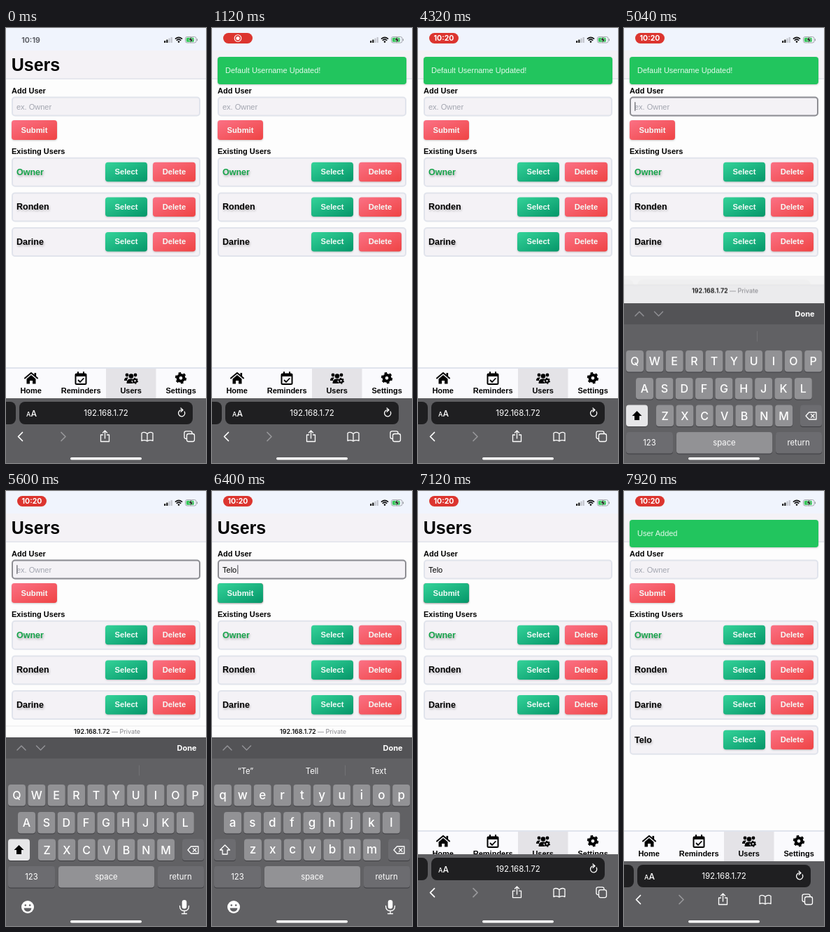
Recreate the animation shown at these times as an HTML page. Size 286 px wide and 618 px high, loop 8000 ms.

```html
<!DOCTYPE html>
<html lang="en">
<head>
<meta charset="utf-8">
<title>Users</title>
<style>
html, body { margin: 0; width: 100%; height: 100%; overflow: hidden; background: #fdfdfd; }
svg { display: block; width: 286px; height: 618px; font: 11px "Liberation Sans", Arial, sans-serif; }
.b { font-weight: 700; }
.sys { font-family: Inter, Roboto, sans-serif; }
.mid { text-anchor: middle; }
.btn { filter: drop-shadow(0 1px 1px #0003); }
.name { font-size: 12.5px; font-weight: 700; filter: drop-shadow(1px 2px 1.5px #0004); }
.line { fill: none; stroke-linecap: round; stroke-linejoin: round; }

/* hard changes */
.banner, .msg1, .msg2, .sel, .focus, .typed, .blank, .c2, .c3, .c4, .caret,
.row4, .upper, .lower, .hint1, .hint2 { animation: 8s step-end infinite; }
.banner { animation-name: banner; }
.msg1 { animation-name: msg1; }
.msg2 { animation-name: msg2; }
.sel0 { animation-name: sel0; }
.sel1 { animation-name: sel1; }
.sel2 { animation-name: sel2; }
.focus { animation-name: focus; }
.typed { animation-name: typed; }
.blank { animation-name: blank; }
.c2 { animation-name: c2; }
.c3 { animation-name: c3; }
.c4 { animation-name: c4; }
.caret { animation-name: caret; }
.row4 { animation-name: row4; }
.upper { animation-name: upper; }
.lower { animation-name: lower; }
.hint1 { animation-name: hint1; }
.hint2 { animation-name: c2; }
@keyframes banner { 0% { opacity: 0 } 13.9% { opacity: 1 } 70% { opacity: 0 } 95% { opacity: 1 } 100% { opacity: 1 } }
@keyframes msg1 { 0% { opacity: 1 } 80%, 100% { opacity: 0 } }
@keyframes msg2 { 0% { opacity: 0 } 80%, 100% { opacity: 1 } }
@keyframes sel0 { 0% { fill: #16a34a } 15% { fill: #000 } 50%, 100% { fill: #16a34a } }
@keyframes sel1 { 0% { fill: #000 } 15% { fill: #16a34a } 30%, 100% { fill: #000 } }
@keyframes sel2 { 0% { fill: #000 } 30% { fill: #16a34a } 50%, 100% { fill: #000 } }
@keyframes focus { 0% { opacity: 0 } 60% { opacity: 1 } 84.8%, 100% { opacity: 0 } }
@keyframes typed { 0% { opacity: 0 } 70.5% { opacity: 1 } 95%, 100% { opacity: 0 } }
@keyframes blank { 0% { opacity: 1 } 70.5% { opacity: 0 } 95%, 100% { opacity: 1 } }
@keyframes c2 { 0% { visibility: hidden } 73.5%, 100% { visibility: visible } }
@keyframes c3 { 0% { visibility: hidden } 76.5%, 100% { visibility: visible } }
@keyframes c4 { 0% { visibility: hidden } 79.5%, 100% { visibility: visible } }
@keyframes caret {
  0% { transform: none } 70.5% { transform: translateX(6.7px) } 73.5% { transform: translateX(12.6px) }
  76.5% { transform: translateX(15px) } 79.5%, 100% { transform: translateX(21px) }
}
@keyframes row4 { 0% { opacity: 0 } 95%, 100% { opacity: 1 } }
@keyframes upper { 0% { opacity: 1 } 70.5%, 100% { opacity: 0 } }
@keyframes lower { 0% { opacity: 0 } 70.5%, 100% { opacity: 1 } }
@keyframes hint1 { 0% { opacity: 0 } 70.5% { opacity: 1 } 73.5%, 100% { opacity: 0 } }

/* slides and fades */
.clock, .pill, .rec, .now { animation: 8s linear infinite; }
.clock { animation-name: clock; }
.pill { animation-name: pill; }
.rec { animation-name: rec; }
.now { animation-name: now; }
@keyframes clock { 0%, 2% { opacity: 1 } 5%, 100% { opacity: 0 } }
@keyframes pill { 0%, 2% { opacity: 0 } 6%, 100% { opacity: 1 } }
@keyframes rec { 0%, 42% { opacity: 1 } 44%, 100% { opacity: 0 } }
@keyframes now { 0%, 42% { opacity: 0 } 44%, 100% { opacity: 1 } }

.keys { animation: keys 8s cubic-bezier(.2,.45,.3,1) infinite, keysFade 8s linear infinite; }
.tools { animation: tools 8s cubic-bezier(.2,.45,.3,1) infinite, toolsFade 8s linear infinite; }
.strip { animation: strip 8s cubic-bezier(.2,.45,.3,1) infinite, stripFade 8s linear infinite; }
.strip rect { animation: tint 8s linear infinite; }
@keyframes keys {
  0%, 60% { transform: translateY(268px) } 66.25%, 84.8% { transform: none }
  91%, 100% { transform: translateY(268px) }
}
@keyframes keysFade { 0%, 87% { opacity: 1 } 88.6%, 100% { opacity: 0 } }
@keyframes tools {
  0%, 60% { transform: none } 66.25%, 84.8% { transform: translateY(-205px) } 91%, 100% { transform: none }
}
@keyframes toolsFade { 0%, 60% { opacity: 1 } 63% { opacity: .06 } 64%, 84.8% { opacity: 0 } 87%, 100% { opacity: 1 } }
@keyframes strip {
  0%, 60% { transform: translateY(205px) } 66.25%, 84.8% { transform: none }
  91%, 100% { transform: translateY(205px) }
}
@keyframes stripFade { 0%, 60% { opacity: 0 } 62.5%, 84.8% { opacity: 1 } 87%, 100% { opacity: 0 } }
@keyframes tint { 0%, 60% { fill: #777779 } 63% { fill: #ebebed } 65.5%, 100% { fill: #fdfdfd } }
</style>
</head>
<body>
<script>
const rect = (x, y, w, h, fill, r = 0, more = '') =>
  `<rect x="${x}" y="${y}" width="${w}" height="${h}" rx="${r}" fill="${fill}" ${more}/>`;
const text = (x, y, s, cls = '', fill = '#000', more = '') =>
  `<text x="${x}" y="${y}" class="${cls}" fill="${fill}" ${more}>${s}</text>`;
const line = (d, color = '#fff', w = 1.3, more = '') =>
  `<path class="line" d="${d}" stroke="${color}" stroke-width="${w}" ${more}/>`;
const dot = (x, y, r, fill, more = '') => `<circle cx="${x}" cy="${y}" r="${r}" fill="${fill}" ${more}/>`;
const group = (cls, ...parts) => `<g class="${cls}">${parts.join('')}</g>`;
const size = n => `font-size="${n}"`;

const button = (x, y, w, h, label, paint) =>
  rect(x, y, w, h, `url(#${paint})`, 4, 'class="btn"') +
  text(x + w / 2, y + h / 2 + 3.6, label, 'b mid', '#f4fbf8', size(11.2));

const frame = (y, h) => rect(9, y + 1, 268, h - 2, '#f4f2f6', 4, 'stroke="#e1e4ec" stroke-width="2"');

function userRow(i, name, cls) {
  const y = 183.7 + i * 49.7;
  return frame(y, 42) + text(15, y + 25, name, 'name ' + cls) +
    button(142, y + 7, 60, 27.5, 'Select', 'green') +
    button(210, y + 7, 61, 27.5, 'Delete', 'red');
}

const gear = (x, y, s) => `<g transform="translate(${x} ${y}) scale(${s})" fill="none" stroke="#000">
  <circle r="4.4" stroke-width="4"/><circle r="7" stroke-width="2.4" stroke-dasharray="3.665"/></g>`;

function statusBar() {
  const bars = [3, 4.5, 6.5, 8].map((h, i) =>
    rect(226 + i * 3.2, 21 - h, 2.3, h, i < 2 ? '#222' : '#c3c6cd', .6)).join('');
  return text(35.5, 21, '10:19', 'sys b mid clock', '#5d5f66', size(10.5)) +
    group('pill', rect(16, 7, 42, 15, '#dc352f', 7.5),
      group('rec', dot(37, 14.5, 4.8, 'none', 'stroke="#fff" stroke-width="1.1"'), dot(37, 14.5, 2.6, '#fff')),
      text(37, 18.3, '10:20', 'sys b mid now', '#fff', size(10.5))) +
    bars +
    line('M242.5 15.2Q247 11.4 251.5 15.2M244.3 17.3Q247 15.1 249.7 17.3', '#111', 1.7) + dot(247, 19.6, 1.3, '#111') +
    rect(256.5, 12.5, 15.5, 8.5, 'none', 2.5, 'stroke="#999ca3" stroke-width=".9"') +
    rect(257.8, 13.8, 11, 5.9, '#35c759', 1.5) + rect(272.8, 15.3, 1.2, 3, '#999ca3', .6) +
    '<path d="M265.6 11.5l-4.4 5.8h2.7l-.9 4.6 4.6-6h-2.8z" fill="#111" stroke="#fff" stroke-width=".5"/>';
}

function page() {
  return rect(0, 0, 286, 618, '#fdfdfd') + rect(0, 0, 286, 32, '#f0f4fd') +
    rect(0, 32, 286, 40, '#f4f2f6') + rect(0, 71.5, 286, 1.5, '#e1e4ec') +
    text(7.7, 61, 'Users', 'b', '#000', size(25)) +
    text(8, 93, 'Add User', 'b') + frame(97.5, 28) +
    rect(9, 98.5, 268, 26, 'none', 4, 'class="focus" stroke="#8e8e93" stroke-width="2"') +
    text(15, 115.5, 'ex. Owner', 'blank', '#a3a6b0') +
    group('typed', text(15, 115.5, 'T<tspan class="c2">e</tspan><tspan class="c3">l</tspan><tspan class="c4">o</tspan>')) +
    group('focus', rect(15, 105, 1.6, 13, '#85858b', .8, 'class="caret"')) +
    button(8, 131, 65, 28, 'Submit', 'red') +
    group('typed', button(8, 131, 65, 28, 'Submit', 'green')) +
    text(8, 179, 'Existing Users', 'b') +
    ['Owner', 'Ronden', 'Darine'].map((n, i) => userRow(i, n, 'sel sel' + i)).join('') +
    group('row4', userRow(3, 'Telo', '')) +
    group('banner', rect(8, 41, 270, 39, '#22c55e', 4, 'class="btn"'),
      text(19, 64.3, 'Default Username Updated!', 'msg1', '#e3f8ea'),
      text(19, 64.3, 'User Added', 'msg2', '#e3f8ea'));
}

function nav() {
  const labels = ['Home', 'Reminders', 'Users', 'Settings'];
  return rect(0, 483, 286, 43, '#fafafd') + rect(143, 483, 71.5, 43, '#e4e3e7') +
    rect(0, 482, 286, 2, '#e0e4ed') +
    labels.map((s, i) => text(35.7 + i * 71.5, 519, s, 'b mid')).join('') +
    line('M27 497.5L36 490L45 497.5', '#000', 2) + rect(40.5, 490, 2.6, 5, '#000') +
    '<path d="M29.5 498.5L36 493L42.5 498.5V505.5H38V501H34V505.5H29.5Z"/>' +
    rect(99.5, 491.5, 15, 14.5, 'none', 1.5, 'stroke="#000" stroke-width="2"') +
    rect(99, 491, 16, 4, '#000') + line('M103 489V492M111 489V492', '#000', 2) +
    line('M103.5 500.5L106 503L110.8 498', '#000', 1.8) +
    dot(173, 493, 2.4, '#000') + dot(179, 494.5, 3.3, '#000') + dot(185, 493, 2.4, '#000') +
    '<path d="M169 501q0-4.6 4-4.6h2q-2 2-2 4.6zM172.5 505q0-6.5 5-6.5h4q-4 3 0 6.5z"/>' +
    gear(184.5, 501.3, .55) + gear(250, 497.3, 1);
}

function toolbar() {
  return group('tools', rect(0, 526, 286, 320, '#5e5e61'),
    rect(-20, 531, 34, 32, '#1f1f21', 8), rect(19, 531, 248, 32, '#1f1f21', 8),
    text(29, 551.5, '<tspan font-size="9">A</tspan>A', 'sys', '#fff', 'font-size="12" font-weight="500"'),
    text(143, 551, '192.168.1.72', 'sys mid', '#fff', size(11.5)),
    line('M255.2 545A4.6 4.6 0 1 1 251.2 542.6M250 540L253 542.7L250 545.2'),
    line('M23.5 574.5L17.5 580.5L23.5 586.5', '#fff', 1.7),
    line('M79 574.5L85 580.5L79 586.5', '#98989b', 1.7),
    line('M138.5 578H135.5V587.5H147.5V578H144.5M141.5 583V572M138.5 575L141.5 572L144.5 575'),
    line('M202 576.5Q198 573 194 575.5V586.5Q198 584.5 202 587Q206 584.5 210 586.5V575.5Q206 573 202 576.5V587'),
    rect(258.5, 576.5, 11, 11, 'none', 2.5, 'stroke="#fff" stroke-width="1.3"'),
    line('M258.5 583.5H257.5Q255 583.5 255 581V575Q255 572.8 257.5 572.8H263.5Q266 572.8 266 575V576.3'));
}

function strip() {
  return group('strip', rect(0, 334, 286, 70, '#fdfdfd'), line('M0 334H286', '#dddde0', .6),
    text(97, 345.3, '192.168.1.72 <tspan font-weight="400" fill="#85858a">— Private</tspan>', 'sys', '#111', 'font-size="9" font-weight="600"'));
}

function keyboard() {
  const rows = [['qwertyuiop', 3, 417], ['asdfghjkl', 17, 456], ['zxcvbnm', 46, 494.5]];
  const key = (x, y, w, fill) => rect(x, y + 1, w, 30.5, '#3d3d40', 4) + rect(x, y, w, 30.5, fill, 4);
  const caps = rows.map(([s, x, y]) => [...s].map((_, i) => key(x + i * 28.35, y, 25, '#929295')).join('')).join('');
  const letters = (up, dy) => rows.map(([s, x, y]) => [...s].map((c, i) =>
    text(x + 12.5 + i * 28.35, y + dy, up ? c.toUpperCase() : c, 'sys mid', '#fff',
      `font-size="${up ? 16 : 17}" font-weight="500"`)).join('')).join('');
  const hints = (cls, words) => group(cls, ...words.map((s, i) => text(48 + i * 95, 401.5, s, 'sys mid', '#fff', size(11.3))));
  const word = (x, y, s) => text(x, y, s, 'sys mid', '#fff', size(11.3));
  const arrow = 'M18.5 503L11.5 510H15V516H22V510H25.5Z';
  return group('keys', rect(0, 350, 286, 290, '#616164'), rect(0, 350, 286, 30, '#535356'),
    line('M16 368L22 362L28 368', '#929296', 1.5), line('M43.5 362L49.5 368L55.5 362', '#929296', 1.5),
    text(258.5, 369, 'Done', 'sys b mid', '#fff'), line('M190.5 390V404', '#77777a', .8),
    hints('hint1', ['“T”', 'The', 'To']), hints('hint2', ['“Te”', 'Tell', 'Text']),
    caps,
    group('upper', letters(true, 21), key(3, 494.5, 31, '#e6e6e8'), `<path d="${arrow}"/>`),
    group('lower', letters(false, 20.5), key(3, 494.5, 31, '#6c6c70'), line(arrow)),
    key(252, 494.5, 31, '#6c6c70'), key(3, 533, 67, '#6c6c70'),
    key(75, 533, 137, '#929295'), key(217, 533, 66, '#6c6c70'),
    line('M260 510L264.5 505H275V515H264.5ZM267.5 507.8L272 512.2M272 507.8L267.5 512.2'),
    word(36.5, 552, '123'), word(143.5, 551.5, 'space'), word(249.5, 552, 'return'),
    dot(31, 591, 9, '#fff'), dot(27.8, 588.5, 1.3, '#616164'), dot(34.2, 588.5, 1.3, '#616164'),
    '<path d="M25.5 592.5h11q-1 5-5.500 5t-5.500-5z" fill="#616164"/>',
    rect(251.7, 581, 6.6, 12.5, '#fff', 3.3),
    line('M248.500 589.500Q248.500 596.500 255 596.500T261.500 589.500M255 596.500V600.500M251.500 600.500H258.500'));
}

const gradient = (id, from, to) => `<linearGradient id="${id}" x2="1" y2="1">
  <stop stop-color="${from}"/><stop offset="1" stop-color="${to}"/></linearGradient>`;

document.body.innerHTML = `<svg viewBox="0 0 286 618">
  <defs>${gradient('green', '#34d399', '#059669')}${gradient('red', '#fb7185', '#ef4444')}</defs>
  ${page()}${statusBar()}${nav()}${toolbar()}${strip()}${keyboard()}
  ${rect(92, 610, 102, 3.4, '#fff', 1.7)}</svg>`;
</script>
</body>
</html>
```
